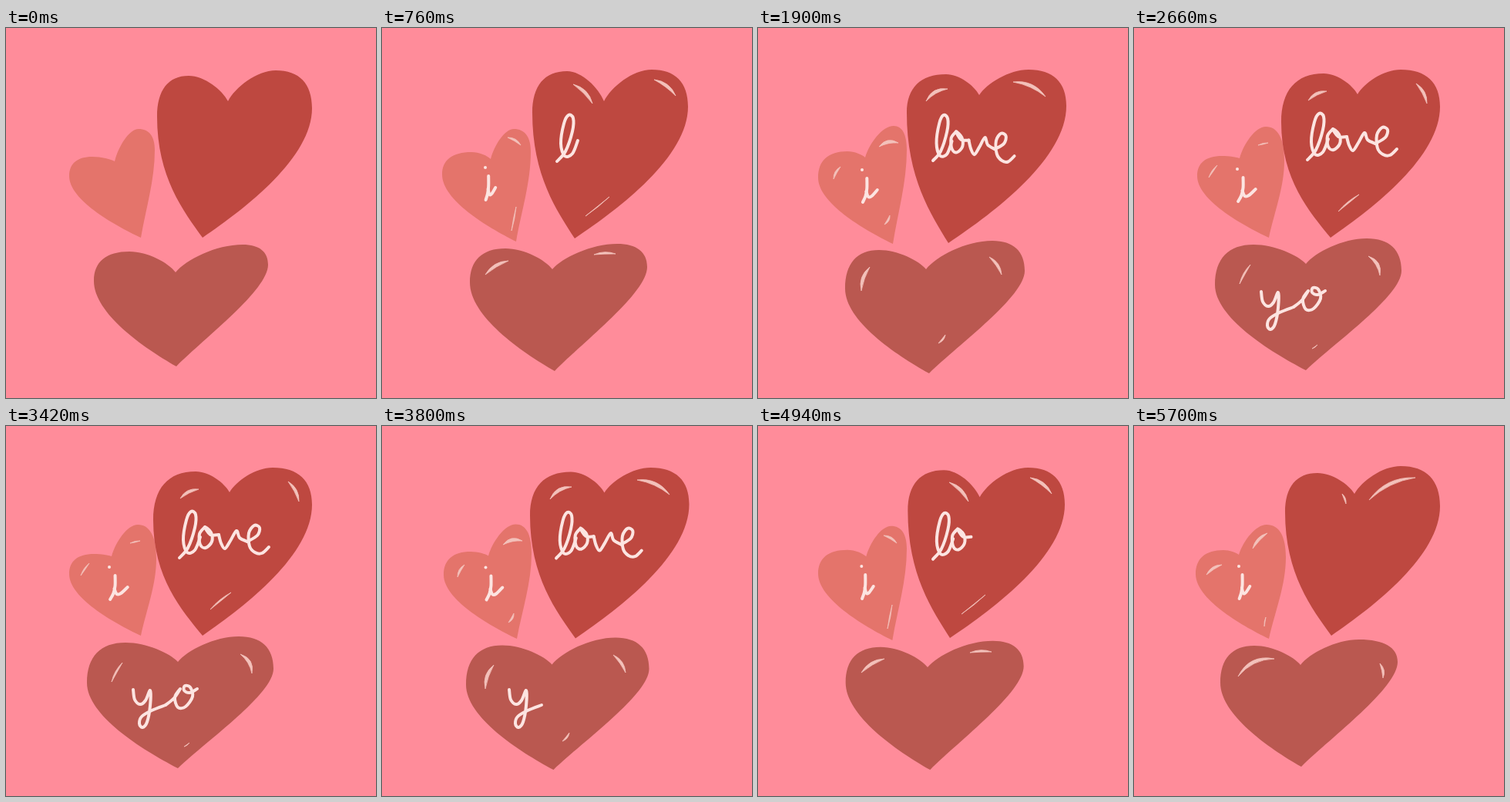
An HTML page that plays this animation: 480 px wide and 480 px high, repeating every 6.08 s.

```html
<!DOCTYPE html>
<html lang="en">
<head>
<meta charset="utf-8">
<title>Hearts</title>
<style>
  html, body { margin: 0; width: 100%; height: 100%; overflow: hidden; background: #ff8c9a; }
  svg { display: block; width: 100vw; height: 100vh; }
  .pose { visibility: hidden; }
  .pose.on { visibility: visible; }
  .small { fill: #e4746b; }
  .big { fill: #be4840; }
  .low { fill: #ba5850; }
  .shine { fill: #f3c1ba; stroke: #f3c1ba; stroke-width: .8; stroke-linejoin: round; }
  .ink { fill: none; stroke: #fce4e1; stroke-width: 4; stroke-linecap: round; stroke-linejoin: round; }
</style>
</head>
<body>
<svg id="stage" viewBox="0 0 480 480"></svg>
<script>
const STEP = 380, LAST = 8;

// Hearts: notch, right top, right edge, tip, left edge, left top.
// Words: x, y, width scale, slope. Glints: start, end, bend.
const keys = [
  {
    at: 0,
    small: '141 173 172 131 193 158 175 272 82 192 112 167',
    big: '288 95 350 55 397 104 255 272 196 115 237 62',
    low: '220 317 307 281 340 307 221 439 114 328 160 290',
    glints: []
  },
  {
    at: 1,
    small: '136 167 172 128 197 170 175 276 80 192 116 161',
    big: '286 88 346 52 397 104 256 272 196 112 238 61',
    low: '216 310 292 277 342 306 217 442 112 333 156 285',
    i: '136 182 .65 0',
    glints: ['305 96 365 67 .27', '270 88 275 101 .26', '94 193 114 180 .32', '154 159 173 139 .3',
      '171 248 169 260 0', '135 325 182 302 .38', '319 308 323 327 .35']
  },
  {
    at: 2,
    small: '141 170 171 131 193 160 174 277 78 190 116 161',
    big: '288 95 350 54 397 102 250 273 195 110 240 56',
    low: '221 313 305 280 344 310 224 445 114 330 160 286',
    i: '134 181 .6 0', love: '227 173 1 0',
    glints: ['248 73 273 98 .3', '353 67 381 88 .3', '264 244 295 219 0', '163 142 180 152 .32',
      '174 232 168 263 .05', '134 320 164 302 .28', '275 294 303 293 .2']
  },
  {
    at: 5,
    small: '139 168 176 127 193 158 175 280 78 194 116 160',
    big: '287 87 351 54 400 101 247 279 193 110 244 60',
    low: '218 313 304 276 346 315 222 448 113 338 157 288',
    i: '135 184 .9 0', love: '227 172 .91 .07',
    glints: ['218 95 246 79 .4', '331 70 373 89 .3', '98 196 107 180 .3', '157 154 182 149 .45',
      '164 255 171 243 -.35', '134 341 145 310 .32', '300 297 316 320 .3', '234 409 243 398 -.3']
  },
  {
    at: 7,
    small: '137 169 171 128 195 172 175 272 82 192 114 166',
    big: '290 86 346 54 397 102 255 272 191 122 246 59',
    low: '223 306 302 273 347 315 223 444 105 333 155 281',
    i: '134 183 1.08 0', love: '225 171 1 0',
    glints: ['226 94 250 82 .35', '366 72 380 98 .3', '265 238 292 216 .1', '97 194 108 178 .15',
      '161 152 174 149 .15', '137 332 151 307 .15', '304 296 319 321 .45', '231 416 238 411 0']
  }
];

// Side curvature: edge handle, then tip handle across and up.
const sides = {
  small: { right: [.35, .35, .33], left: [.38, .4, .22] },
  big: { right: [.38, .4, .23], left: [.5, .42, .22] },
  low: { right: [.25, .32, .29], left: [.38, .4, .22] }
};

// One letter appears per step, in this order.
const letters = [
  ['i', '0 0', '7 11 7 24 5 34 1 42', '6 28 9 35 14 34 22 26'],
  ['love', '0 0 11 -13 20 -39 21 -56 15 -60 9 -49 5 -23 10 -7 20 -10 27 -27'],
  ['love', '33 -40 26 -31 27 -17 34 -13 42 -21 41 -33 33 -40 40 -30 51 -30'],
  ['love', '51 -30 54 -19 59 -12 66 -22 74 -35 78 -26 88 -21'],
  ['love', '88 -21 101 -29 104 -39 97 -42 90 -32 91 -15 98 -7 107 -6 116 -14'],
  ['you', '0 -1 2 12 9 18 16 13 22 0 22 20 18 41 12 48 8 43 11 34 24 26 42 19'],
  ['you', '42 19 53 10 61 -2 54 9 58 22 68 21 77 8 74 -4 67 -6 66 0 73 3 83 -2'],
  ['you', '83 -2 84 11 90 18 98 12 105 -2 106 11 111 18 120 12']
];

const nums = s => s.split(' ').map(Number);
const path = (cls, d) => `<path class="${cls}" d="${d}"/>`;

function pairs(n) {
  return n.flatMap((v, i) => i % 2 ? [] : [[v, n[i + 1]]]);
}

// Neighbouring keys around a step and the share of the second.
function around(step) {
  const j = keys.findIndex(k => k.at >= step);
  const b = keys[j < 0 ? keys.length - 1 : j];
  const a = j > 0 ? keys[j - 1] : b;
  return { a, b, t: a === b ? 0 : (step - a.at) / (b.at - a.at) };
}

function blend({ a, b, t }, part) {
  const to = nums(b[part]), from = a[part] ? nums(a[part]) : to;
  return to.map((v, i) => from[i] + (v - from[i]) * t);
}

// Half a heart, from notch to tip; tangents are level at the top, upright at the edge.
function half(notch, top, edge, tip, [down, across, up]) {
  const mix = (p, q, kx, ky) => [p[0] + (q[0] - p[0]) * kx, p[1] + (q[1] - p[1]) * ky];
  return [
    notch, mix(notch, top, .15, .45), mix(top, notch, .4, 0),
    top, mix(top, edge, .65, 0), mix(edge, top, 0, .65),
    edge, mix(edge, tip, 0, down), mix(tip, edge, across, up), tip
  ];
}

function heart(name, n) {
  const [notch, topR, edgeR, tip, edgeL, topL] = pairs(n);
  const right = half(notch, topR, edgeR, tip, sides[name].right);
  const left = half(notch, topL, edgeL, tip, sides[name].left).reverse();
  return path(name, `M${notch}C${right.slice(1).join(' ')} ${left.slice(1).join(' ')}Z`);
}

function glint(s) {
  const [x, y, ex, ey, bend] = nums(s);
  const dx = ex - x, dy = ey - y, len = Math.hypot(dx, dy);
  const thick = Math.min(4, .8 + .3 * Math.abs(bend) * len);
  const inner = bend - Math.sign(bend || 1) * 2 * thick / len;
  const ctrl = b => `${(x + ex) / 2 + dy * b} ${(y + ey) / 2 - dx * b}`;
  return path('shine', `M${x} ${y}Q${ctrl(bend)} ${ex} ${ey}Q${ctrl(inner)} ${x} ${y}Z`);
}

// Smooth pen line through the points; a lone point is a dot.
function stroke(p) {
  let d = `M${p[0]}` + (p.length > 1 ? '' : 'h.01');
  for (let i = 0; i + 1 < p.length; i++) {
    const a = p[i - 1] || p[i], b = p[i], c = p[i + 1], e = p[i + 2] || c;
    d += `C${b.map((v, k) => v + (c[k] - a[k]) / 6)} ${c.map((v, k) => v - (e[k] - b[k]) / 6)} ${c}`;
  }
  return path('ink', d);
}

function letter([word, ...lines], near) {
  const [x, y, wide, slope] = word === 'you' ? [165, 343, 1, 0] : blend(near, word);
  return lines.map(s => stroke(pairs(nums(s)).map(([u, v]) => [x + u * wide, y + v + u * slope]))).join('');
}

function pose(step) {
  const near = around(step);
  const { glints } = near.t > .5 || near.a === near.b ? near.b : near.a;
  return '<g class="pose">' +
    Object.keys(sides).map(name => heart(name, blend(near, name))).join('') +
    glints.map(glint).join('') +
    letters.slice(0, step).map(l => letter(l, near)).join('') + '</g>';
}

const stage = document.getElementById('stage');
stage.innerHTML = Array.from({ length: LAST + 1 }, (_, i) => pose(i)).join('');
const groups = [...stage.children];
const start = performance.now();
let shown = -1;

// Steps run forward to the last pose, then back.
function tick() {
  const i = Math.floor((performance.now() - start) / STEP) % (2 * LAST);
  const next = Math.min(i, 2 * LAST - i);
  if (next !== shown) {
    groups.forEach((g, k) => g.classList.toggle('on', k === next));
    shown = next;
  }
  requestAnimationFrame(tick);
}
tick();
</script>
</body>
</html>
```
